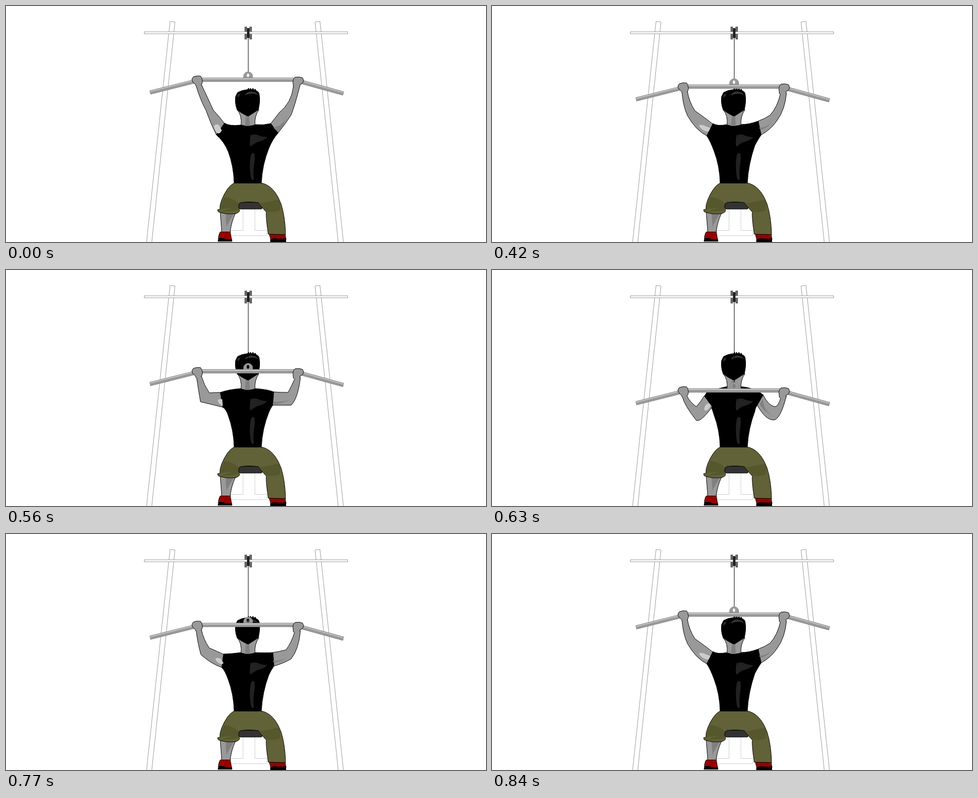
These frames come from a looping animation (970 px wide and 480 px high, 1260 ms). An HTML page with a canvas:

```html
<!DOCTYPE html>
<html lang="en">
<head>
<meta charset="utf-8">
<title>Lat pulldown</title>
<style>
  html, body { margin: 0; width: 970px; height: 480px; overflow: hidden; background: #fff; }
  canvas { display: block; }
</style>
</head>
<body>
<canvas id="stage" width="970" height="480"></canvas>
<script>
const ctx = document.getElementById('stage').getContext('2d');
const SKIN = '#999', SHADE = '#808080', LIGHT = '#ccc', INK = '#000';
const LOOP = 1260, HOLD = 420, STEP = 70;

// Key poses from stretched to pulled; equal path structure lets them be blended.
const poses = [
  {
    drop: 0,
    shirt: 'M475 242 Q452 245 441 238 L425 262 Q441 276 449 296 Q460 325 461 360 L516 360 Q518 322 531 290 Q538 272 550 258 L535 239 Q520 243 503 241 Z',
    left: 'M384 162 Q393 192 404 212 Q414 240 425 262 L441 239 Q435 229 419 212 Q409 190 395 160',
    right: 'M581 163 Q577 197 552 217 Q543 229 535 239 L550 258 Q563 242 576 222 Q583 205 594 162',
    shine: 'M420 244 Q426 238 431 243 L436 253 Q433 260 428 259 Q422 254 420 244 Z',
    shadow: 'M567 227 Q558 245 540 247 L550 257 Q561 244 567 227 Z'
  },
  {
    drop: 14,
    shirt: 'M475 241 Q456 245 446 239 L434 264 Q441 274 449 296 Q460 325 461 360 L516 360 Q518 322 531 284 Q536 274 544 262 L538 234 Q520 241 503 241 Z',
    left: 'M384 176 Q386 203 395 223 Q412 253 434 264 L446 240 Q434 230 410 213 Q398 194 395 174',
    right: 'M583 178 Q577 205 562 222 Q552 229 538 234 L544 262 Q563 252 576 233 Q593 209 595 176',
    shine: 'M418 243 Q423 240 430 244 L441 248 Q439 257 433 255 Q422 251 418 243 Z',
    shadow: 'M563 235 Q558 247 539 248 L544 251 Q560 247 563 235 Z'
  },
  {
    drop: 56,
    shirt: 'M475 241 Q450 243 433 249 L438 279 Q445 283 449 296 Q460 325 461 360 L516 360 Q518 322 531 290 Q534 282 539 275 L541 248 Q530 243 503 241 Z',
    left: 'M385 218 Q389 244 393 268 Q414 273 438 279 L433 249 Q422 249 411 250 Q400 234 395 216',
    right: 'M584 220 Q577 236 570 249 Q555 249 541 248 L539 275 Q557 275 576 275 Q590 262 595 218',
    shine: 'M428 264 Q432 262 437 263 L438 276 Q436 277 433 273 Q428 270 428 264 Z',
    shadow: 'M573 265 Q556 269 540 268 L539 273 Q556 272 573 265 Z'
  },
  {
    drop: 95,
    shirt: 'M475 237 Q449 243 434 249 L429 257 Q443 273 449 296 Q460 325 461 360 L516 360 Q518 322 531 288 Q532 280 536 275 L548 254 Q532 240 503 237 Z',
    left: 'M384 256 Q389 276 413 306 Q423 309 445 278 L429 256 Q423 266 413 278 Q399 268 394 256',
    right: 'M584 258 Q579 278 571 278 Q558 275 548 254 L536 275 Q553 306 570 305 Q583 303 595 256',
    shine: 'M429 282 Q430 275 436 271 L442 274 Q440 282 435 285 Q429 288 429 282 Z',
    shadow: 'M567 296 Q549 287 547 262 L541 273 Q551 290 567 296 Z'
  }
];

function blendPath(a, b, t) {
  const ends = b.match(/\d+/g).map(Number);
  let i = 0;
  return a.replace(/\d+/g, n => +n + (ends[i++] - n) * t);
}

function poseAt(position) {
  const i = Math.floor(position), t = position - i;
  const a = poses[i], b = poses[i + 1];
  if (!t) return a;
  const pose = { drop: a.drop + (b.drop - a.drop) * t };
  for (const part of ['shirt', 'left', 'right', 'shine', 'shadow'])
    pose[part] = blendPath(a[part], b[part], t);
  return pose;
}

function shape(d, fill, stroke, width = 1) {
  const path = new Path2D(d);
  if (fill) {
    ctx.fillStyle = fill;
    ctx.fill(path, 'evenodd');
  }
  if (stroke) {
    ctx.strokeStyle = stroke;
    ctx.lineWidth = width;
    ctx.stroke(path);
  }
}

function drawFrame() {
  shape('M331.5 31.5 L341.5 32.5 L294.5 481 H284 Z', '#fff', SKIN);
  shape('M624.5 32.5 L634.5 31.5 L682 481 H671.5 Z', '#fff', SKIN);
  shape('M482 42 H487 V68 H482 Z M492 42 H497 V68 H492 Z', '#666');
  shape('M279.5 52.5 H690.5 V56.5 H279.5 Z', '#fff', SKIN);
  shape('M487 45 H492 V65 H487 Z', '#222');
  shape('M479 413 V456.5 H454 V467 H527 V456.5 H503 V413', '#fff', LIGHT);
}

function drawLegs() {
  shape('M433 420 L436 460 H453 Q455 440 464 421 Z', SKIN, INK);
  shape('M444 423 H461 Q451 436 446 449 Q444 437 444 423 Z', SHADE);
  shape('M433 459.5 H453 L456 475 L429 474 Q430 463 433 459.5 Z', '#900', INK);
  shape('M429 473 Q437 470 444 474 L457 475 V479 H428 Z', INK);
  shape('M532 464 H564 L566 475 H535 Z', '#900', INK);
  shape('M534 475 Q541 471 548 473 L566 473 V480 H534 Z', INK);
  shape('M473 413 Q467 408 471 399 H512 L518 411 L516 413 Z', '#333', INK);
  shape('M461 360 Q447 367 436 394 Q432 404 432 414 L428 414 Q427 418 430 419 ' +
    'Q447 425 465 422 Q473 419 472 415 Q467 403 474 400 Q490 397 510 400 ' +
    'Q516 409 526 419 Q525 432 530 464 L565 465 Q564 428 556 403 Q542 365 516 360 Z', '#616237', INK);
  shape('M442 388 Q458 391 469 400 Q468 409 470 415 Q450 419 434 418 L460 410 L433 413 Q436 397 442 388 Z', '#56572c');
  shape('M513 401 Q535 398 552 393 Q556 405 553 416 Q540 421 525 417 Z', '#56572c');
}

function drawHead() {
  shape('M467 211 Q477 222 475 242 Q489 246 503 242 Q502 224 511 211 Z', SKIN, INK);
  shape('M485 222 H491 L493 244 H483 Z', SHADE);
  shape('M464 184 L468 176 Q476 171 488 170 L490 167 L493 171 L494 167 L497 171 L499 167 ' +
    'L501 171 L504 169 L505 172 Q512 174 512 182 Q514 193 510 211 L490 224 L486 223 ' +
    'Q474 217 467 211 Q462 197 464 184 Z', INK, INK);
  shape('M466 187 Q467 179 474 178 Q472 181 470 186 L468 183 Z', '#333');
  shape('M483 182 Q486 173 497 174 Q507 175 508 181 Q499 175 483 182 Z', '#333');
}

function drawBar(drop) {
  shape(`M489.5 65 V${135 + drop}`, null, INK);
  ctx.save();
  ctx.translate(0, drop);
  shape('M480 147 V143 A9.3 9.3 0 0 1 498.6 143 V147 Z M486 141 A3 4 0 0 0 492 141 A3 4 0 0 0 486 141 Z', SKIN, SHADE, 0.7);
  const bar = 'M291 176 L386 152 L396 150 H582 L592 153 L682 178';
  shape(bar, null, SHADE, 8.4);
  shape(bar, null, SKIN, 7);
  ctx.translate(0, -2);
  shape(bar, null, LIGHT, 1.8);
  ctx.restore();
}

function drawArms(pose) {
  shape(pose.left, SKIN, INK);
  shape(pose.shine, LIGHT);
  shape(pose.right, SKIN, INK);
  shape(pose.shadow, SHADE);
  ctx.save();
  ctx.translate(0, pose.drop);
  shape('M384 163 L383 160 L377 154 Q374 148 379 144 Q386 141 393 142.5 Q396 145 397 153 Q397 158 394 161', SKIN, INK);
  shape('M581 165 L580 157 Q579 149 584 145 Q592 143 599 146 Q602 150 601 154 Q598 159 594 160 V163', SKIN, INK);
  ctx.restore();
}

function draw(pose) {
  ctx.fillStyle = '#fff';
  ctx.fillRect(0, 0, 970, 480);
  drawFrame();
  drawLegs();
  shape(pose.shirt, INK, INK);
  shape('M494 263 Q500 260 508 262 Q515 266 528 267 Q522 273 508 277 Q500 280 495 286 Q491 284 494 263 Z', '#222');
  shape('M495 302 Q498 297 502 300 Q504 310 501 325 Q499 340 501 352 Q498 357 495 349 Q492 330 493 315 Z', '#222');
  drawHead();
  drawBar(pose.drop);
  drawArms(pose);
}

const sequence = [1, 1.5, 2, 3, 2, 1.5, 1];

function tick(now) {
  const time = now % LOOP;
  const step = Math.min(Math.floor((time - HOLD) / STEP), sequence.length - 1);
  draw(poseAt(step < 0 ? 0 : sequence[step]));
  requestAnimationFrame(tick);
}

const start = performance.now();
tick(0);
function tickFromStart() {}
</script>
</body>
</html>
```
